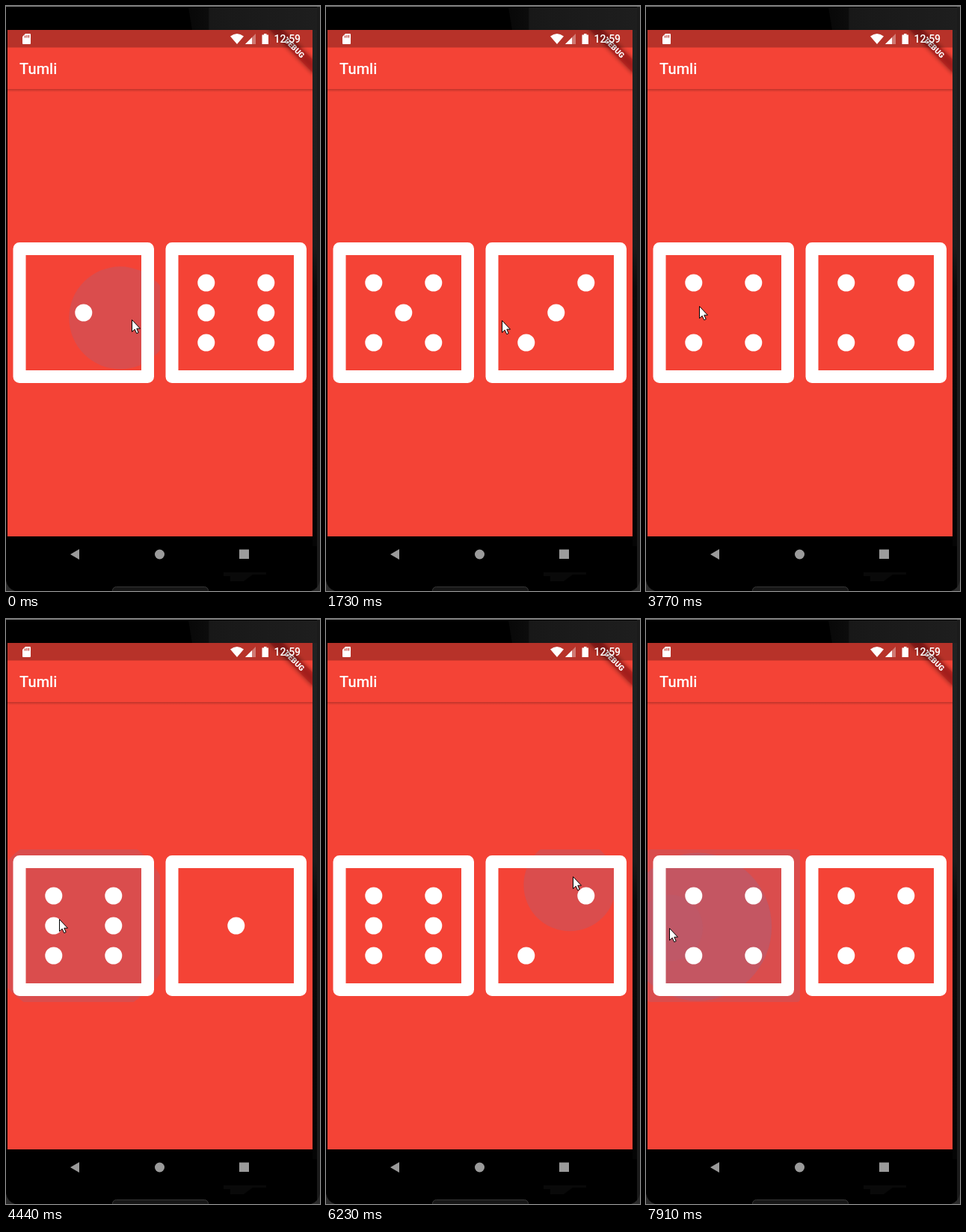
Animation of 420 by 782 pixels, one loop 8000 ms. Source, as an HTML page:

```html
<!DOCTYPE html>
<html lang="en">
<head>
<meta charset="utf-8">
<title>Dice app</title>
<style>
html, body { margin: 0; width: 100%; height: 100%; overflow: hidden; background: #000; }
svg { display: block; width: 100%; height: 100%; }
text { font-family: Roboto, "Noto Sans", sans-serif; fill: #fff; }
</style>
</head>
<body>
<svg viewBox="0 0 420 782" xmlns="http://www.w3.org/2000/svg">
  <defs>
    <clipPath id="screen"><rect x="2" y="32" width="408" height="677"/></clipPath>
    <clipPath id="button0"><rect x="2" y="308" width="204" height="204" rx="4"/></clipPath>
    <clipPath id="button1"><rect x="206" y="308" width="204" height="204" rx="4"/></clipPath>
    <linearGradient id="shade" x2="0" y2="1">
      <stop offset="0" stop-opacity=".22"/>
      <stop offset="1" stop-opacity="0"/>
    </linearGradient>
    <linearGradient id="gloss">
      <stop offset="0" stop-color="#080808"/>
      <stop offset=".15" stop-color="#0c0c0c"/>
      <stop offset=".16" stop-color="#181818"/>
      <stop offset="1" stop-color="#1e1e1e"/>
    </linearGradient>
    <linearGradient id="edge" x2="0" y2="1">
      <stop offset="0" stop-color="#222"/>
      <stop offset=".42" stop-color="#1c1c1c"/>
      <stop offset=".5" stop-color="#0b0b0b"/>
      <stop offset="1" stop-color="#050505"/>
    </linearGradient>
    <filter id="soft" x="-20%" y="-100%" width="140%" height="300%"><feGaussianBlur stdDeviation="3"/></filter>
  </defs>

  <!-- phone body -->
  <rect width="420" height="782"/>
  <path d="M244 2H420V32H249Z" fill="url(#gloss)"/>
  <rect x="410" y="32" width="6" height="690" fill="url(#edge)"/>
  <rect x="416" width="4" height="782" fill="#1b1b1b"/>
  <path d="M0 .5H420" stroke="#777"/>
  <path d="M0 768Q2 779 12 782H0ZM420 768Q418 779 408 782H420Z" fill="#2a2a2a"/>
  <path d="M291 757H348V760H330L318 769H300V762H291Z" fill="#090909"/>
  <rect x="142.500" y="776.500" width="128" height="14" rx="5" fill="#161616" stroke="#363636"/>

  <g clip-path="url(#screen)">
    <rect x="2" y="32" width="408" height="677" fill="#f44336"/>
    <rect x="2" y="111" width="408" height="4" fill="url(#shade)"/>
    <text x="18" y="91" font-size="20" font-weight="500">Tumli</text>
    <g transform="translate(410 32) rotate(45)">
      <rect x="-44" y="28" width="88" height="12" opacity=".5" filter="url(#soft)"/>
      <rect x="-44" y="28" width="88" height="12" fill="#b71c1c" fill-opacity=".63"/>
      <text y="37.700" font-size="10.200" font-weight="900" text-anchor="middle">DEBUG</text>
    </g>
    <rect x="2" y="32" width="408" height="23.500" fill-opacity=".25"/>
    <g fill="#fff">
      <path d="M26 37H32Q33 37 33 38V50Q33 51 32 51H23Q22 51 22 50V41Z"/>
      <path d="M25.500 39.500V42.500M28 39V42.500M30.500 39V42.500" stroke="#b73229" stroke-width="1.200"/>
      <path d="M300 40.500Q309 33.500 318 40.500L309 51Z"/>
      <path d="M334 37V51H320Z" fill-opacity=".35"/>
      <path d="M329 42V51H320Z"/>
      <path d="M345 37H348.500V38.500H351V51H342.500V38.500H345Z"/>
    </g>
    <text x="358.500" y="49" font-size="14" font-weight="500">12:59</text>
    <g id="ripples" fill="#2196f3" fill-opacity=".12"></g>
    <g id="dice" fill="#fff"></g>
  </g>

  <g fill="#9b9b9b">
    <path d="M86 733L98 726V740Z"/>
    <circle cx="205.500" cy="733" r="6.500"/>
    <rect x="312" y="726.500" width="13" height="12.500"/>
  </g>
  <path id="cursor" d="M.5 .5V16.500L4.200 13.200L6.700 18.700L9.200 17.600L6.800 12.200H11.500Z" fill="#fff" stroke="#000"/>
</svg>
<script>
const LOOP = 8000;
const STEP = 121.5, PHASE = 12;       // the screen refreshes in steps
const HOLD = 170, ROLL_LAG = 60;      // press length, and wait from release to roll
const GROW = 225, FADE = 110;         // ripple after release
const GLIDE = 240;                    // cursor travel
const SIDE = 204;                     // button size

// Cursor stops: arrival time, x, y
const stops = [[-LOOP, 168, 419], [1840, 348, 421], [3750, 71, 401], [6180, 330, 344], [7270, 31, 413]];

// Press time and the two faces it rolls
const taps = [
  [-183, "52"], [575, "43"], [1075, "53"], [2058, "33"], [2640, "44"],
  [4120, "61"], [4430, "35"], [4560, "22"], [4825, "53"], [5480, "62"],
  [6040, "25"], [6650, "13"], [7515, "44"], [7685, "36"], [7865, "16"]
];
const firstRoll = taps[taps.length - 1][1];

const $ = id => document.getElementById(id);
const clamp = v => Math.max(0, Math.min(1, v));
const mix = (a, b, p) => a + (b - a) * p;

function set(el, attrs) {
  for (const key in attrs) el.setAttribute(key, attrs[key]);
}

function add(parent, tag, attrs = {}) {
  const el = document.createElementNS("http://www.w3.org/2000/svg", tag);
  set(el, attrs);
  return parent.appendChild(el);
}

// cubic-bezier(.25, .1, .25, 1)
function ease(x) {
  const curve = (a, b, s) => 3 * a * s * (1 - s) ** 2 + 3 * b * s * s * (1 - s) + s ** 3;
  let lo = 0, hi = 1;
  for (let i = 0; i < 24; i++) {
    const mid = (lo + hi) / 2;
    if (curve(0.25, 0.25, mid) < x) lo = mid; else hi = mid;
  }
  return curve(0.1, 1, lo);
}

function cursorAt(t) {
  return stops.reduce(([px, py], [arrival, x, y]) => {
    const p = clamp((t - arrival) / GLIDE + 1);
    return [mix(px, x, p), mix(py, y, p)];
  }, [0, 0]);
}

// Does a face show the pip in this column and row?
function hasPip(face, col, row) {
  if (col === 1) return row === 1 && face % 2 === 1;
  if (row === 1) return face === 6;
  return col + row === 2 ? face > 1 : face > 3;
}

function makeDie(index) {
  const g = add($("dice"), "g", { transform: `translate(${SIDE * index} 0)` });
  add(g, "path", {
    "fill-rule": "evenodd",
    d: "M18 316H189.500a8.500 8.500 0 0 1 8.500 8.500V495.500a8.500 8.500 0 0 1-8.500 8.500H18" +
       "a8.500 8.500 0 0 1-8.500-8.500V324.500a8.500 8.500 0 0 1 8.500-8.500ZM26.500 333V487H181V333Z"
  });
  const pips = [];
  for (let col = 0; col < 3; col++) {
    for (let row = 0; row < 3; row++) {
      const el = add(g, "circle", { cx: 63.8 + 40 * col, cy: 370 + 40 * row, r: 11.5 });
      pips.push({ el, col, row });
    }
  }
  return face => pips.forEach(({ el, col, row }) =>
    set(el, { visibility: hasPip(face, col, row) ? "visible" : "hidden" }));
}

// The ripple grows slowly while held, fast once released, and drifts to the button's middle.
function makeRipple([down]) {
  const up = down + HOLD;
  const [x, y] = cursorAt(up);
  const index = x < 2 + SIDE ? 0 : 1;
  const g = add($("ripples"), "g", { "clip-path": `url(#button${index})` });
  const el = add(g, "circle");
  return t => {
    const freed = Math.max(0, t - up);
    const p = ease(clamp((Math.min(t, up) - down) / 1000 + freed / GROW));
    set(el, {
      cx: mix(x, 104 + SIDE * index, p),
      cy: mix(y, 410, p),
      r: mix(43.3, 149.3, p),
      opacity: clamp((t - down) / 75) * (1 - clamp((freed - GROW) / FADE))
    });
  };
}

const dice = [0, 1].map(makeDie);
const ripples = taps.map(makeRipple);

function render(time) {
  const t = Math.floor((time + PHASE) / STEP) * STEP - PHASE;
  const rolled = taps.filter(([down]) => down + HOLD + ROLL_LAG <= t).pop();
  const faces = rolled ? rolled[1] : firstRoll;
  dice.forEach((show, i) => show(Number(faces[i])));
  ripples.forEach(draw => draw(t));
  set($("cursor"), { transform: `translate(${cursorAt(t).map(Math.round)})` });
}

const start = performance.now();
function loop() {
  render((performance.now() - start) % LOOP);
  requestAnimationFrame(loop);
}
loop();
</script>
</body>
</html>
```
